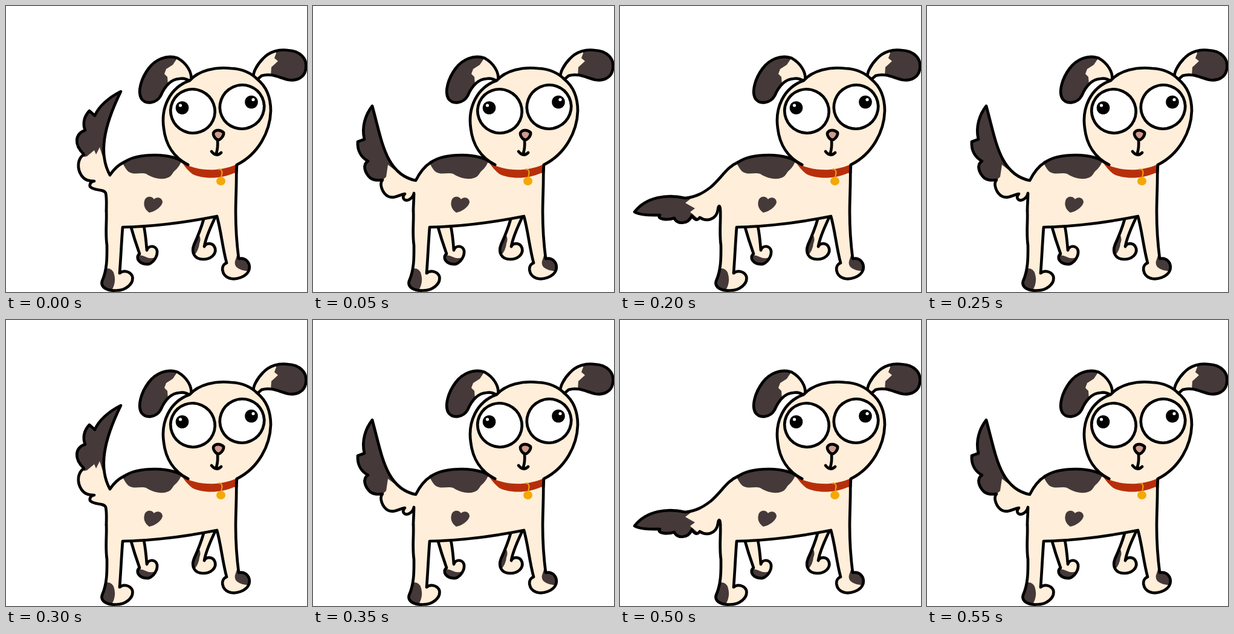
An HTML page that plays this animation: 498x472 px, repeating every 600 ms.

```html
<!DOCTYPE html>
<html lang="en">
<head>
<meta charset="utf-8">
<title>Dog wagging its tail</title>
<style>
  html, body { margin: 0; width: 100%; height: 100%; overflow: hidden; background: #fff; }
  svg { display: block; width: 100vw; height: 100vh; }
  .line { fill: none; stroke: #000; stroke-width: 4.7; stroke-linecap: round; stroke-linejoin: round; }
  .fur { fill: #ffeed9; }
  .spot { fill: #453939; }
  .pose { visibility: hidden; animation: 300ms step-end infinite; }
  .up { animation-name: up; }
  .raised { animation-name: raised; }
  .low { animation-name: low; }
  .down { animation-name: down; }
  /* Six steps per wag: up, raised, low, down, low, raised */
  @keyframes up { 0% { visibility: visible } 16.6667%, 100% { visibility: hidden } }
  @keyframes raised {
    0%, 33.3333% { visibility: hidden }
    16.6667%, 83.3333%, 100% { visibility: visible }
  }
  @keyframes low {
    0%, 50%, 83.3333%, 100% { visibility: hidden }
    33.3333%, 66.6667% { visibility: visible }
  }
  @keyframes down { 0%, 66.6667%, 100% { visibility: hidden } 50% { visibility: visible } }
</style>
</head>
<body>
<svg id="stage" viewBox="0 0 498 472" xmlns="http://www.w3.org/2000/svg"></svg>
<script>
let clips = 0;

// Furry shape with dark patches clipped to it and an outline on top
function part(outline, patches = '', fill = outline) {
  const id = 'clip' + clips++;
  return `<clipPath id="${id}"><path d="${fill}"/></clipPath>
    <path class="fur" d="${fill}"/>
    <path class="spot" d="${patches}" clip-path="url(#${id})"/>
    <path class="line" d="${outline}"/>`;
}

const pose = (name, outline, patch) => `<g class="pose ${name}">${part(outline, patch)}</g>`;

function eye(x, y, tilt, px, py, shine) {
  return `<ellipse class="line" style="fill:#fff" cx="${x}" cy="${y}" rx="36.8" ry="36" transform="rotate(${tilt} ${x} ${y})"/>
    <circle cx="${px}" cy="${py}" r="10.8"/>
    <circle cx="${px + shine}" cy="${py - 4}" r="2.6" fill="#fff"/>`;
}

const farLegs =
  part('M206 362C211 380 216 395 221 409C213 415 220 427 236 426C245 423 251 412 250 404C248 395 236 394 233 403C232 390 231 377 228 363',
    'M212 413Q222 409 231 414Q239 418 246 415L242 432H212Z') +
  part('M327 352C323 366 317 381 311 394C306 407 312 418 326 418C340 418 348 409 346 400C343 390 331 390 328 397C331 380 339 364 346 349',
    'M314 372Q325 380 320 392Q319 403 311 412L302 408Z');

const back = 'M195 258C207 250 224 246 246 246C268 246 288 252 301 262';
const legs = 'C382 288 380 315 380 340C380 368 382 394 385 417C398 415 405 425 402 436C398 447 380 453 369 449C357 445 354 428 365 424C358 398 356 372 349 347C298 357 248 364 193 365C191 390 190 415 188 441C194 436 205 437 209 446C212 459 197 470 181 469.5C167 470 156 464 159 454C168 434 167 412 167 395C164 374 167 356 166 338';
const body = part(
  back + 'M381 264' + legs,
  `M193 259Q197 268 202 273C211 280 223 274 232 277C240 282 249 286 262 285C273 283 274 278 278 273C285 267 288 262 290 256L246 240Z
   M160 434Q176 430 179 443Q183 458 173 472L150 468Z
   M379 421Q377 430 386 434Q395 439 406 436V412H382Z`,
  back + 'L301 250H381V264' + legs + 'L167 308L175 288Z') +
  '<path class="spot" d="M237 341C230 336 227 329 229 322C230 314 241 312 245 319C249 314 259 316 259 324C257 332 247 339 237 341Z"/>';

const tails =
  pose('up',
    'M195 258C184 263 178 270 172 279C153 245 161 200 190 141C170 151 153 166 147 181L138 173C128 183 127 196 131 205C114 211 112 229 129 245C118 252 117 268 125 280C131 288 138 289 146 289C140 290 138 294 139 298C146 306 162 301 165 309C167 319 166 329 166 338',
    'M100 236L130 249L134 248L146 238L149 245L155 233L160 249L200 200V130H100Z') +
  pose('raised',
    'M195 258C184 265 177 274 170 288C150 284 136 272 126 254C113 230 108 201 98 165C87 179 80 199 85 220L74 224C73 239 80 250 91 256C81 262 86 276 95 284C101 288 108 288 115 287C109 294 115 309 124 314C134 319 144 311 152 310C146 317 151 322 158 320C163 318 166 313 167 309C167 319 166 329 166 338',
    'M80 298L113 289L121 282L124 262L137 272L130 220L100 150L60 200Z') +
  pose('low',
    'M195 258C176 266 168 284 150 299C137 309 126 315 108 317C78 310 43 315 24 340C36 346 51 345 66 345C60 352 78 354 90 350C93 360 112 362 119 346C123 353 128 355 132 349C144 357 160 352 162 336C163 328 166 328 166 338',
    'M10 300H117V318L108 325L124 334L116 340L128 350L110 370L10 360Z') +
  pose('down',
    'M195 258C178 266 168 283 150 299C134 313 123 323 110 334C86 342 64 364 58 396C72 396 85 390 97 382C95 391 108 387 117 376C125 384 140 378 140 364C145 369 151 367 151 359C160 361 165 352 164 340C163 330 166 328 166 338',
    'M90 320L116 330L111 340L130 341L125 350L141 354L135 390L45 405Z');

const ears =
  part('M306 124C309 109 298 94 284 86C266 80 247 88 236 103C224 119 217 141 224 153C231 163 249 161 256 148C263 132 272 121 287 120C294 119 300 121 304 124',
    'M283 78L282 88L276 97L265 104L262 112L267 117L268 130L250 170H210V78Z') +
  part('M410 119C407 111 416 96 425 87C436 75 452 71 466 73C486 74 499 86 496 104C494 118 481 124 468 122C453 119 440 110 423 115L415 122',
    'M447 66V78L444 86L450 91L439 101L438 116L470 130H498V66Z');

const head = part(
  'M301 262C278 250 264 229 261 202C256 169 270 135 304 123C319 106 347 100 373 103C391 104 405 110 416 121C432 134 438 152 438 173C437 207 418 244 382 262') +
  eye(309, 173.5, 25, 291.500, 168, -3) + eye(390.500, 166.5, -25, 406, 158.5, 3);

const nose =
  `<path class="line" style="fill:#d09a8c" d="M344 208C348 203 356 205 360 209C361 214 355 221 351 221C346 220 341 212 344 208Z"/>
   <path class="line" d="M350 222Q351 233 348 243M340 240Q348 250 356 242"/>`;

const collar =
  `<path fill="#b72f0a" d="M291 258C313 272 350 275 380 262L379 275C354 287 322 285 308 277Q299 270 291 258Z"/>
   <path class="line" d="M290 256L301 262M382 262L381 276"/>
   <path fill="none" stroke="#f0a208" stroke-width="2" d="M351 270C355 267 359 273 357 278Q357 281 355 284"/>
   <ellipse cx="355.500" cy="289" rx="7.500" ry="7" fill="#f3a805"/>`;

document.getElementById('stage').innerHTML = farLegs + body + tails + ears + head + nose + collar;
</script>
</body>
</html>
```
